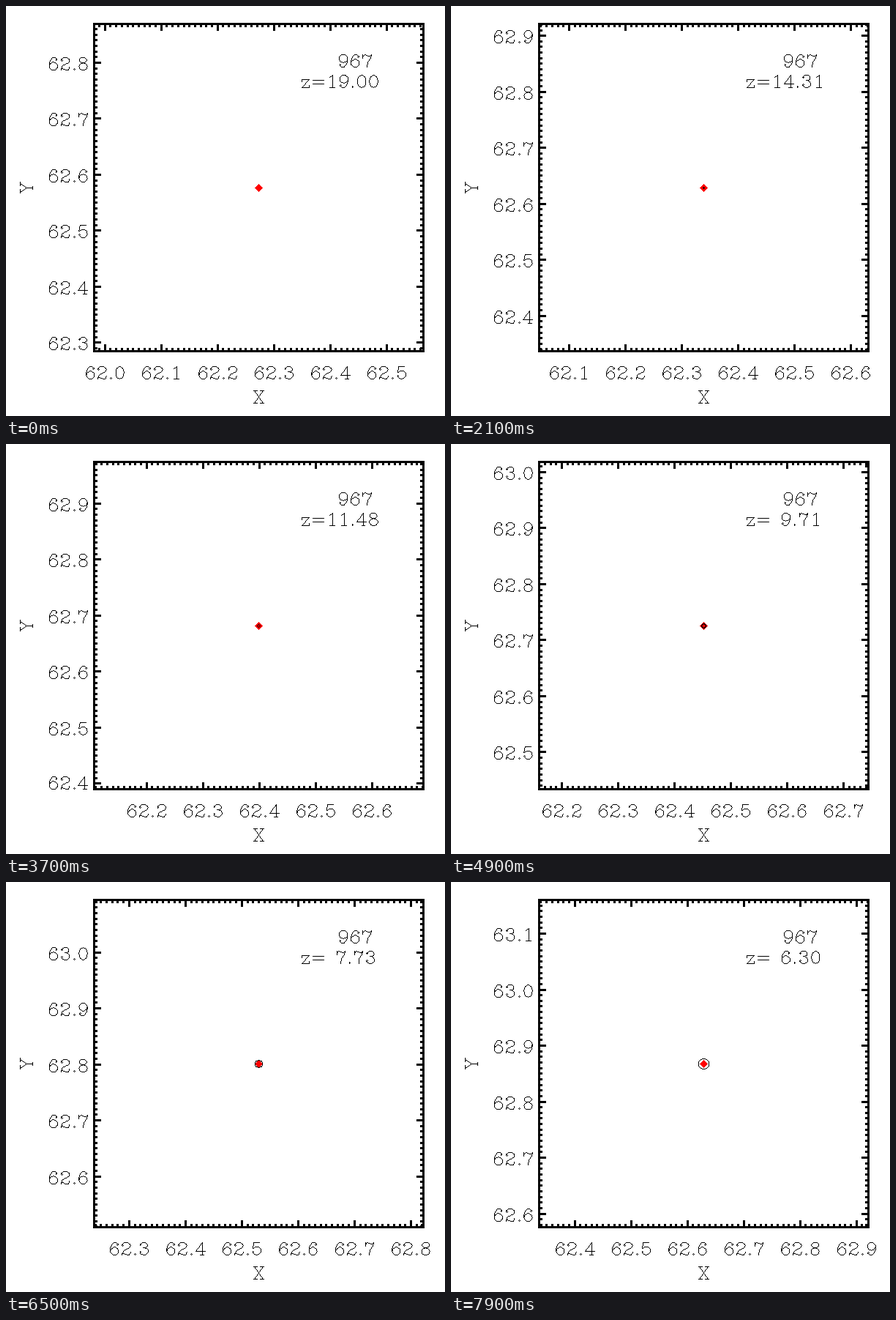
Write a matplotlib script that moves like this. It is 600 px wide and 560 px high and loops after 8000 ms.

```python
import math

import numpy as np
import matplotlib.pyplot as plt
from matplotlib.animation import FuncAnimation
from matplotlib.collections import LineCollection, PolyCollection
from matplotlib.patches import Rectangle

W, H, DPI = 600, 560, 100
FRAMES, INTERVAL = 80, 100
PX = 72 / DPI                      # one pixel in points
LEFT, RIGHT, TOP, BOTTOM = 120, 570, 24, 471
MID_X, MID_Y = 345, 247.5
SCALE_X, SCALE_Y = 770, 765        # pixels per data unit
UNIT = 0.81                        # pixels per glyph unit

# key points of the halo's path: step, x, y
PATH = np.array([(0, 62.273, 62.577), (21, 62.339, 62.629), (37, 62.399, 62.682),
                 (49, 62.452, 62.726), (58, 62.479, 62.764), (72, 62.581, 62.839),
                 (79, 62.629, 62.868)])


# --- stroke font: x centred on the glyph, y up from the baseline ---

def arc(cy, rx, ry, a0=0, a1=360, cx=0, n=16):
    t = np.radians(np.linspace(a0, a1, n + 1))
    return [*zip(cx + rx * np.cos(t), cy + ry * np.sin(t))]


def dot(x, y):
    return arc(y, 1, 1, cx=x, n=4)


def bar(x, y, half=3):
    return [(x - half, y), (x + half, y)]


def flip(strokes):
    return [[(-x, 21 - y) for x, y in s] for s in strokes]


SIX = [arc(6.5, 7, 6.5), arc(8, 8, 13, 180, 50, cx=1), dot(5, 17)]
GLYPHS = {
    "0": [arc(10.5, 7, 10.5)],
    "1": [[(-4, 17), (1, 21), (1, 0)], bar(0.5, 0, 4.5)],
    "2": [dot(-6, 16), arc(16, 7, 5, 170, -40) + [(-4, 8), (-7, 3), (-7, 0)],
          [(-7, 2), (-4, 3), (1, 0), (5, 0), (7, 5)]],
    "3": [dot(-6, 17), arc(16.5, 6, 4.5, 165, -100), arc(6, 7, 6, 80, -165), dot(-6, 5)],
    "4": [[(3, 0), (3, 21), (-8, 6), (8, 6)], bar(3, 0)],
    "5": [[(5, 21), (-5, 21), (-7, 11)], arc(7, 7, 7, 145, -155), dot(-6, 5)],
    "6": SIX,
    "7": [[(-7, 21), (-7, 15)], [(-7, 17), (-4, 21), (3, 18), (5, 18), (7, 21)],
          [(7, 21), (6, 15), (1, 9), (0, 0)]],
    "8": [arc(16.5, 6, 4.5), arc(6, 7, 6)],
    "9": flip(SIX),
    ".": [dot(0, 1)],
    "=": [bar(0, 12, 9), bar(0, 6, 9)],
    "z": [[(-6, 10), (-6, 14), (6, 14), (-6, 0), (7, 0), (7, 4)]],
    "X": [[(-7, 21), (7, 0)], [(7, 21), (-7, 0)]]
         + [bar(x, y) for x in (-6, 6) for y in (0, 21)],
    "Y": [[(-7, 21), (0, 10), (0, 0)], [(8, 21), (0, 10)],
          bar(-6, 21), bar(7, 21), bar(0, 0)],
    " ": [],
}
WIDTH = {".": 10, "=": 26, "z": 18, " ": 15}


def trace(points):
    """Pixels along a polyline, one pixel thick."""
    p = np.rint(points)
    runs = [np.rint(np.linspace(a, b, int(np.abs(b - a).max()) + 1))
            for a, b in zip(p[:-1], p[1:])]
    return np.vstack(runs)


def text(s, x, y, align=0.0, upright=False):
    """Pixels of s with its baseline at (x, y); align is 0 left to 1 right."""
    pen = -align * sum(WIDTH.get(c, 20) for c in s)
    out = []
    for c in s:
        w = WIDTH.get(c, 20)
        for stroke in GLYPHS[c]:
            u, v = ((np.array(stroke) + [pen + w / 2, 0]) * UNIT).T
            out.append(trace(np.column_stack((x - v, y - u) if upright else (x + u, y - v))))
        pen += w
    return out


def squares(pixels):
    return np.asarray(pixels)[:, None] + [(0, 0), (1, 0), (1, 1), (0, 1)]


def marks(centre, half):
    """Hundredths in view, each with its tick length and label."""
    for k in range(math.ceil((centre - half) * 100), math.floor((centre + half) * 100) + 1):
        major = k % 10 == 0
        yield k / 100, 9 if major else 4, f"{k / 100:.1f}" if major else ""


def axes_marks(cx, cy):
    ticks, labels = [], []
    for value, size, label in marks(cx, (RIGHT - LEFT) / 2 / SCALE_X):
        x = round(MID_X + (value - cx) * SCALE_X)
        ticks += [[(x, BOTTOM), (x, BOTTOM - size - .5)], [(x, TOP), (x, TOP + size + .5)]]
        labels += text(label, x, 509, 0.5)
    for value, size, label in marks(cy, (BOTTOM - TOP) / 2 / SCALE_Y):
        y = round(MID_Y - (value - cy) * SCALE_Y)
        ticks += [[(LEFT, y), (LEFT + size + .5, y)], [(RIGHT, y), (RIGHT - size - .5, y)]]
        labels += text(label, 113, min(y + 10, BOTTOM), 1)
    return np.array(ticks) + 0.5, labels


fig = plt.figure(figsize=(W / DPI, H / DPI), dpi=DPI, facecolor="white")
ax = fig.add_axes([0, 0, 1, 1])
ax.set(xlim=(0, W), ylim=(H, 0))
ax.axis("off")

ax.add_patch(Rectangle((LEFT + .5, TOP + .5), RIGHT - LEFT, BOTTOM - TOP, fill=False,
                       ec="black", lw=3 * PX, joinstyle="miter", snap=False))
diamond = [(345 + i, 248 + j) for i in range(-5, 6) for j in range(-5, 6)
           if abs(i) + abs(j) <= 5]
tick_art = LineCollection([], colors="black", linewidths=3 * PX, capstyle="butt", snap=False)
ink_art = PolyCollection([], fc="black", ec="none", lw=0, snap=False, zorder=3)
for art in (PolyCollection(squares(diamond), fc="red", ec="none", lw=0, snap=False),
            tick_art, ink_art):
    ax.add_collection(art, autolim=False)

FIXED = (text("X", MID_X, 542, 0.5) + text("Y", 36, 248, 0.5, upright=True)
         + text("967", 452.4, 83))


def update(i):
    step, xs, ys = PATH.T
    ticks, ink = axes_marks(np.interp(i, step, xs), np.interp(i, step, ys))
    z = 20 * math.exp(-0.01273 * i - 2.5e-7 * i * i) - 1
    ink += FIXED + text(f"z={z:5.2f}", 401.4, 111)
    r = 7.4 * (i / (FRAMES - 1)) ** 2
    if r > 0.5:
        ink.append(trace(arc(248, r, r, cx=MID_X, n=24)))
    tick_art.set_segments(ticks)
    ink_art.set_verts(squares(np.unique(np.vstack(ink), axis=0)))
    return tick_art, ink_art


anim = FuncAnimation(fig, update, frames=FRAMES, interval=INTERVAL,
                     repeat=True, repeat_delay=0, blit=False)
plt.show()
```
